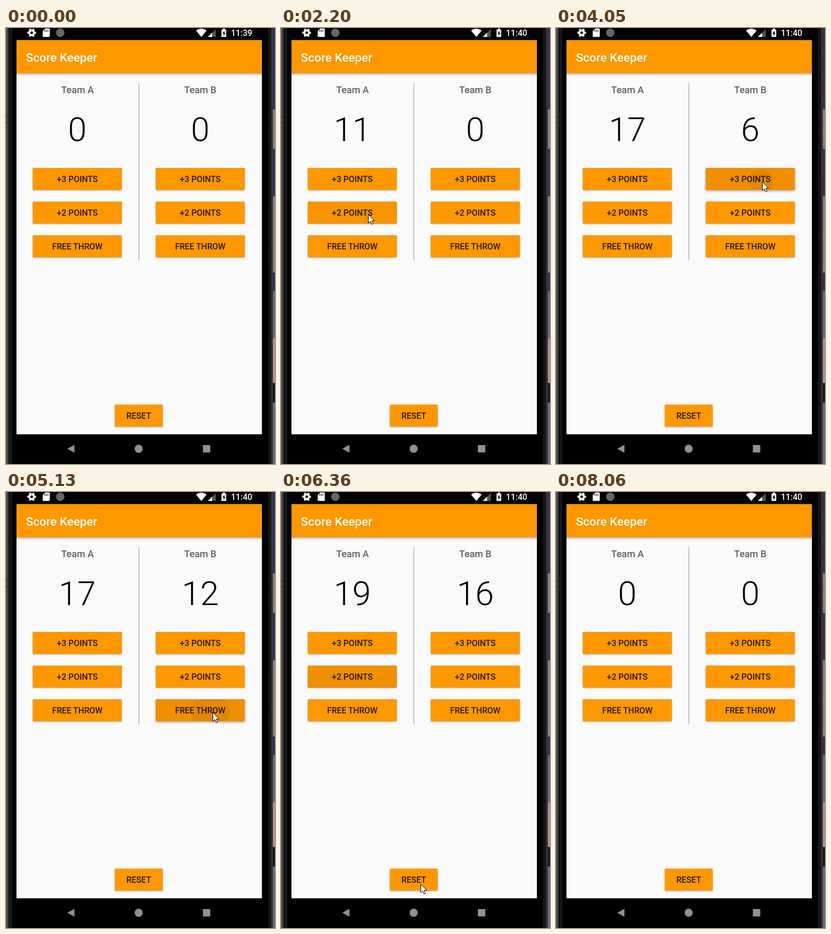
An HTML page for the animation above (8.21 s loop, 513x829 px).

```html
<!DOCTYPE html>
<html lang="en">
<head>
<meta charset="utf-8">
<title>Score Keeper</title>
<style>
  html, body { margin: 0; height: 100%; overflow: hidden; background: #000; }
  svg { display: block; width: 513px; height: 829px; }
  text { font: 500 15.94px Roboto, sans-serif; }
  .mid { text-anchor: middle; }
  .team { font-size: 18.2px; fill: #616161; }
  .score { font-size: 63.8px; font-weight: 300; }
  .title { font-size: 22.8px; fill: #fff; }
  .label { fill: rgba(0, 0, 0, .85); }
  .flat { filter: drop-shadow(0 1.5px 1.2px rgba(0, 0, 0, .32)); }
  .raised { filter: drop-shadow(0 2px 2.2px rgba(0, 0, 0, .34)); }
</style>
</head>
<body>
<svg viewBox="0 0 513 829">
  <defs>
    <linearGradient id="leftEdge">
      <stop offset="0" stop-color="#5b5b5e"/><stop offset=".2" stop-color="#3c3c3f"/>
      <stop offset=".3" stop-color="#0b0b0b"/><stop offset=".5" stop-color="#1d1d1e"/>
      <stop offset=".65" stop-color="#000"/>
    </linearGradient>
    <linearGradient id="rightEdge">
      <stop offset=".5" stop-color="#000"/><stop offset=".65" stop-color="#1d1d1e"/>
      <stop offset=".76" stop-color="#0b0b0b"/><stop offset=".9" stop-color="#3f3f41"/>
      <stop offset="1" stop-color="#2b2b2d"/>
    </linearGradient>
    <linearGradient id="barShadow" x2="0" y2="1">
      <stop stop-opacity=".27"/><stop offset="1" stop-opacity="0"/>
    </linearGradient>
  </defs>

  <!-- device and desktop edges -->
  <rect width="513" height="829"/>
  <rect width="20" height="829" fill="url(#leftEdge)"/>
  <path d="M0 168.500h6M0 180h6" stroke="#18181a"/>
  <rect x="488" width="21" height="829" fill="url(#rightEdge)"/>
  <g fill="none" stroke-width="4">
    <path d="M511 0V829" stroke="#32335a"/>
    <path d="M511 155V230M511 320V465" stroke="#87878b"/>
    <path d="M511 500V590M511 712V829" stroke="#6a6a82"/>
    <path d="M511 590V675" stroke="#b98d9e"/>
    <path d="M511 675V712" stroke="#17171f"/>
  </g>

  <!-- screen -->
  <rect x="20" y="23" width="468" height="749.500" fill="#fafafa"/>
  <rect x="20" y="86" width="468" height="5" fill="url(#barShadow)"/>
  <rect x="20" y="23" width="468" height="63" fill="#ff9800"/>
  <text class="title" x="38" y="63.500">Score Keeper</text>
  <path d="M253.500 105V441.500" stroke="#8c8c8c"/>
  <text class="mid team" x="136.500" y="124">Team A</text>
  <text class="mid team" x="370.500" y="124">Team B</text>
  <text class="mid score" id="scoreA" x="136" y="215"></text>
  <text class="mid score" id="scoreB" x="370.500" y="215"></text>

  <!-- status bar -->
  <g fill="#fff">
    <circle cx="49" cy="9" r="4.500" fill="none" stroke="#fff" stroke-width="4"/>
    <circle cx="49" cy="9" r="7.200" fill="none" stroke="#fff" stroke-width="2.200" stroke-dasharray="3.770" stroke-dashoffset="1.880"/>
    <path d="M75 1h7q1.500 0 1.500 1.500v13q0 1.500-1.500 1.500h-10.500q-1.500 0-1.500-1.500V6z"/>
    <path d="M74 4v3M77 4v3M80 4v3" stroke="#000" stroke-width="1.300"/>
    <circle cx="103.500" cy="9" r="7.300" fill="#666" stroke="#aaa" stroke-dasharray="2 1"/>
    <path d="M362.500 5q10-7.500 20 0l-10 12z"/>
    <path d="M400 2v15h-15z" fill="#555"/>
    <path d="M393 9v8h-8z"/>
    <path d="M411 3h2.500V1h4v2h2.500v14h-9z"/>
    <path d="M416.500 5l-3.500 5.500h2V15l3.500-5.500h-2z" fill="#000"/>
    <text id="clock" x="429" y="15" style="font-size:16px"></text>
  </g>

  <!-- navigation bar -->
  <g fill="#918f98">
    <path d="M117 800l13.500-7.500v15z"/>
    <circle cx="253" cy="800" r="7.700"/>
    <rect x="375.500" y="793" width="14" height="14"/>
  </g>

  <g id="buttons"></g>
  <path id="cursor" d="M0 0V16.500L3.800 13 6.300 18.800 9 17.700 6.500 12H11.700Z" fill="#fff" stroke="#000"/>
</svg>

<script>
const LOOP = 8210, STEP = 76.76, LEAD = 40;
const TAP_DELAY = 40, TAP_GAP = 350, LEAVE = 170, RELEASE = 80;
const $ = id => document.getElementById(id);
const clamp = v => Math.max(0, Math.min(1, v));
const lerp = (a, b, k) => a + (b - a) * k;

function add(parent, tag, attrs, text = '') {
  const el = document.createElementNS('http://www.w3.org/2000/svg', tag);
  set(el, attrs);
  el.textContent = text;
  return parent.appendChild(el);
}
function set(el, attrs) {
  for (const k in attrs) el.setAttribute(k, attrs[k]);
}

function makeButton(id, label, x, y, width = 170) {
  const height = 42, box = { x, y, width, height, rx: 2 };
  const cx = x + width / 2, cy = y + height / 2;
  const g = add($('buttons'), 'g');
  add(add(g, 'clipPath', { id }), 'rect', box);
  const base = add(g, 'rect', { ...box, fill: '#ff9800' });
  const shade = add(g, 'rect', box);
  const ripple = add(add(g, 'g', { 'clip-path': `url(#${id})` }), 'circle');
  add(g, 'text', { class: 'mid label', x: cx, y: y + 27 }, label);
  return { cx, cy, reach: Math.hypot(width, height) / 2, base, shade, ripple, presses: [] };
}

const buttons = { R: makeButton('R', 'RESET', 207.5, 716, 91.5) };
['FREE THROW', '+2 POINTS', '+3 POINTS'].forEach((label, i) => {
  const y = 394 - 64 * i;
  buttons['A' + (i + 1)] = makeButton('A' + (i + 1), label, 51, y);
  buttons['B' + (i + 1)] = makeButton('B' + (i + 1), label, 285.5, y);
});

// pointer stops: arrival, x, y, button tapped there, number of taps
const stops = [
  [30, 469, 719],
  [740, 172, 294, 'A3', 3],
  [1760, 166, 354, 'A2', 3],
  [2779, 158, 414, 'A1', 2],
  [3532, 393, 292, 'B3', 3],
  [4560, 392, 355, 'B2', 1],
  [4897, 394, 419, 'B1', 1],
  [5260, 385, 353, 'B2', 2],
  [5960, 160, 352, 'A2', 1],
  [6320, 266, 745, 'R', 2],
  [7100, 362, 598],
  [7480, 503, 785],
  [7740, 457, 779],
  [7990, 484, 829]
].map(([arrive, x, y, name, taps = 0]) => {
  let leave = arrive;
  for (let i = 0; i < taps; i++) {
    const press = arrive + TAP_DELAY + i * TAP_GAP;
    buttons[name].presses.push({ press, x, y });
    leave = press + LEAVE;
  }
  return { arrive, leave, x, y };
});

// sideways motion runs a little ahead of vertical motion
function pointer(t) {
  const i = stops.findIndex(s => s.arrive > t);
  if (i < 1) return null;
  const a = stops[i - 1], b = stops[i];
  const k = clamp((t - a.leave) / (b.arrive - a.leave));
  return [lerp(a.x, b.x, k ** .8), lerp(a.y, b.y, k ** 1.3)];
}

function drawButton(b, t) {
  const { press, x, y } = b.presses.findLast(p => p.press <= t) || { press: -LOOP, x: b.cx, y: b.cy };
  const age = t - press, grow = clamp(age / 400);
  b.base.setAttribute('class', age > 40 && age < 190 ? 'raised' : 'flat');
  b.shade.setAttribute('opacity', .06 * clamp(age / 80) * clamp((470 - age) / 120));
  set(b.ripple, {
    cx: lerp(x, b.cx, grow * .36),
    cy: lerp(y, b.cy, grow * .36),
    r: b.reach * grow,
    opacity: .055 * clamp((280 - age) / 60)
  });
}

const count = (name, t) => buttons[name].presses.filter(p => p.press + RELEASE <= t).length;

function score(team, t) {
  return count('R', t) ? 0 : [1, 2, 3].reduce((sum, n) => sum + n * count(team + n, t), 0);
}

function draw(now) {
  const t = Math.floor((now % LOOP + LEAD) / STEP) * STEP - LEAD;
  Object.values(buttons).forEach(b => drawButton(b, t));
  for (const team of 'AB') $('score' + team).textContent = score(team, t);
  $('clock').textContent = t < 400 ? '11:39' : '11:40';
  const tip = pointer(t);
  $('cursor').setAttribute('visibility', tip ? 'visible' : 'hidden');
  if (tip) $('cursor').setAttribute('transform', `translate(${tip.map(v => Math.round(v) + .5)})`);
}

const begin = performance.now();
function tick() {
  draw(performance.now() - begin);
  requestAnimationFrame(tick);
}
tick();
</script>
</body>
</html>
```
